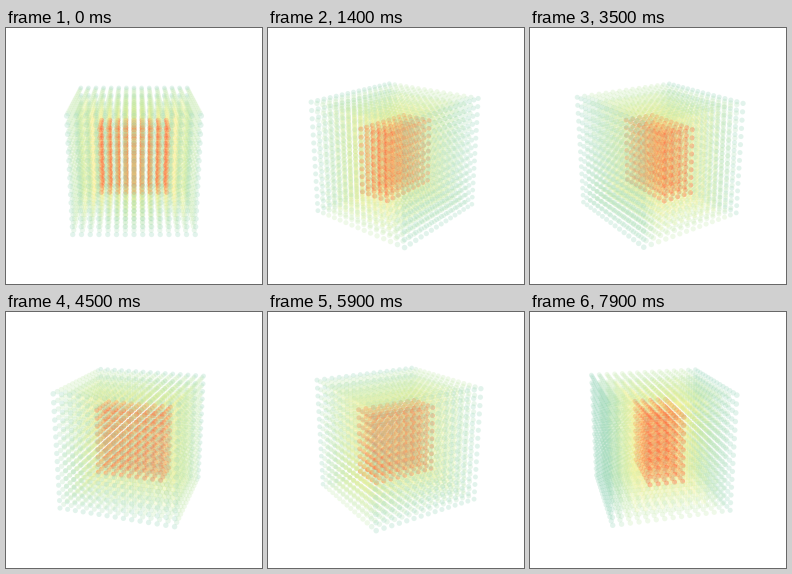
A matplotlib script for the animation above (8000 ms loop, 256x256 px).

```python
import numpy as np
import matplotlib.pyplot as plt
from matplotlib.animation import FuncAnimation

SIZE, DPI = 256, 100
FRAMES, STEP_MS = 80, 100
TURN = np.radians(3.6)          # yaw per frame
TILT = np.radians(20)
DIST, FOCAL = 4.2, 478          # camera distance in cube sides, focal length in px
HALF = 7                        # lattice runs from -HALF to HALF
DOT = 4.9                       # dot diameter in px at the cube's centre

# Lattice, coloured by box distance from the inner block
axis = np.arange(-HALF, HALF + 1)
grid = np.stack(np.meshgrid(axis, axis, axis), axis=-1).reshape(-1, 3)
level = np.maximum(np.abs(grid) - [4, 2, 4], 0).max(axis=1)
X, Y, Z = (grid / (2 * HALF)).T

PALETTE = np.array([
    (255, 118, 64, 0.46),
    (250, 238, 128, 0.25),
    (226, 242, 142, 0.23),
    (188, 230, 160, 0.23),
    (164, 220, 172, 0.24),
    (146, 212, 182, 0.26),
]) / [255, 255, 255, 1]
colors = PALETTE[level]


def project(yaw):
    """Return screen x, y and depth of every lattice point."""
    side = X * np.cos(yaw) - Y * np.sin(yaw)
    near = -(X * np.sin(yaw) + Y * np.cos(yaw))
    up = Z * np.cos(TILT) - near * np.sin(TILT)
    depth = DIST - near * np.cos(TILT) - Z * np.sin(TILT)
    scale = FOCAL / depth
    return SIZE / 2 + side * scale, SIZE / 2 - up * scale, depth


fig = plt.figure(figsize=(SIZE / DPI, SIZE / DPI), dpi=DPI, facecolor="white")
ax = fig.add_axes([0, 0, 1, 1])
ax.set_xlim(0, SIZE)
ax.set_ylim(SIZE, 0)
ax.axis("off")
dots = ax.scatter(X, Y, s=1, linewidths=0)


def draw(frame):
    x, y, depth = project(frame * TURN)
    order = np.argsort(-depth, kind="stable")
    diameter = DOT * DIST / depth[order] * 72 / DPI
    dots.set_offsets(np.column_stack([x, y])[order])
    dots.set_sizes(diameter ** 2, dpi=DPI)
    dots.set_facecolors(colors[order])
    return (dots,)


anim = FuncAnimation(fig, draw, frames=FRAMES, interval=STEP_MS,
                     repeat=True, repeat_delay=0, blit=False)
plt.show()
```
